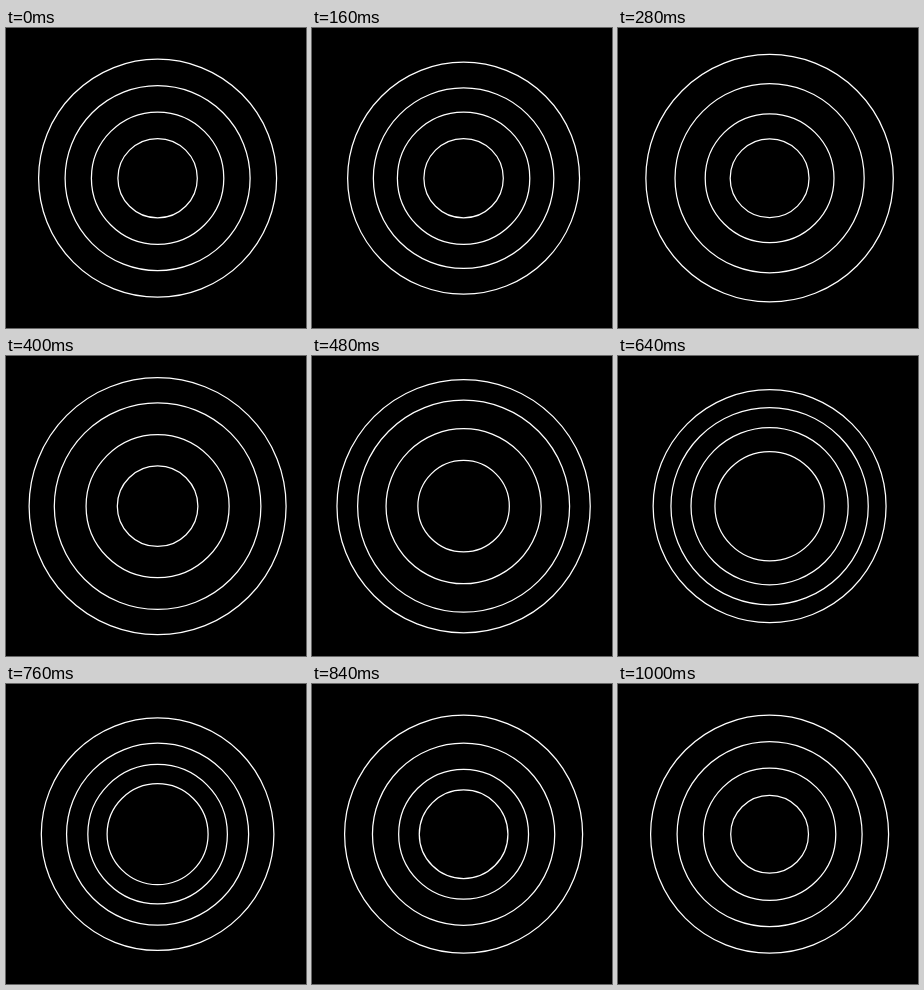
Animation, 300 px wide and 300 px high, one loop 1.04 s. Source, as an HTML page:

```html
<!DOCTYPE html>
<html lang="en">
<head>
<meta charset="utf-8">
<title>Pulsing rings</title>
<style>
  html, body { margin: 0; width: 100%; height: 100%; overflow: hidden; background: #000; }
  svg { display: block; width: 100vw; height: 100vh; }
  circle { fill: none; stroke: #fff; stroke-width: 1.25; }
</style>
</head>
<body>
<svg viewBox="0 0 300 300"></svg>
<script>
  const LOOP = 1040, LAG = 82, MID = 405, HALF = 395, DIP_AT = 320, STEP = 40;

  // Outermost first: resting radius, growth at the peak, shrink at the dips.
  const rings = [
    { rest: 119, peak: 9.5, dip: 4.9 },
    { rest: 92.5, peak: 13.5, dip: 2.3 },
    { rest: 66.2, peak: 14.3, dip: 2.2 },
    { rest: 39.7, peak: 15, dip: 1.2 }
  ];

  const svg = document.querySelector('svg');
  for (const ring of rings) {
    ring.el = document.createElementNS('http://www.w3.org/2000/svg', 'circle');
    ring.el.setAttribute('cx', 151.6);
    ring.el.setAttribute('cy', 150.2);
    svg.append(ring.el);
  }

  const ease = (a, b, p) => a + (b - a) * (1 - Math.cos(Math.PI * p)) / 2;

  // The pulse is symmetric in time: rest, dip, peak, dip, rest.
  function offset({ peak, dip }, t) {
    const d = Math.abs(t - MID);
    if (d >= HALF) return 0;
    return d < DIP_AT
      ? ease(peak, -dip, d / DIP_AT)
      : ease(-dip, 0, (d - DIP_AT) / (HALF - DIP_AT));
  }

  function draw(t) {
    rings.forEach((ring, i) => {
      ring.el.setAttribute('r', ring.rest + offset(ring, t - i * LAG));
    });
  }

  const start = performance.now();
  function frame() {
    const t = (performance.now() - start) % LOOP;
    draw(Math.floor(t / STEP) * STEP);
    requestAnimationFrame(frame);
  }
  draw(0);
  requestAnimationFrame(frame);
</script>
</body>
</html>
```
